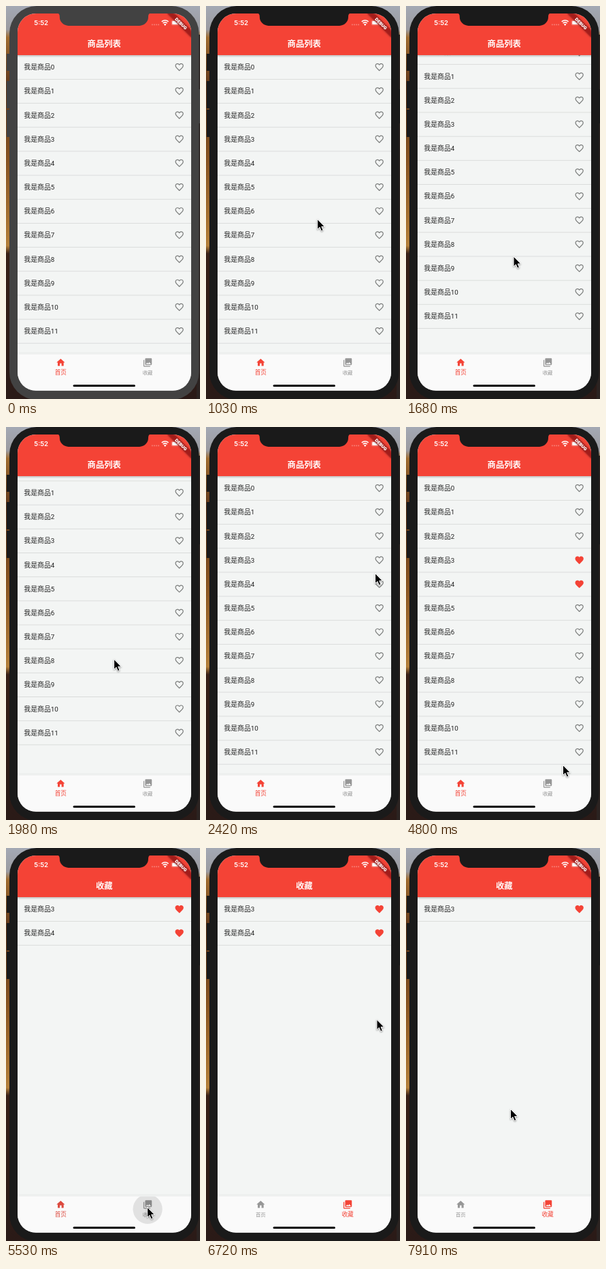
Recreate the animation shown at these times as an HTML page. Size 285 by 576 pixels, loop 8000 ms.

```html
<!DOCTYPE html>
<html lang="zh-CN">
<head>
<meta charset="utf-8">
<style>
html, body { margin: 0; width: 100%; height: 100%; overflow: hidden; background: #1b1b1b; }
svg { display: block; }
text { font-family: Roboto, "Noto Sans CJK SC", "Noto Sans CJK", sans-serif; }
.mid { text-anchor: middle; }
.inter { font-family: Inter, sans-serif; }
</style>
</head>
<body>
<svg width="285" height="576" viewBox="0 0 285 576">
  <defs>
    <linearGradient id="wall" x2="0" y2="1">
      <stop offset="0" stop-color="#a4a9b4"/><stop offset=".06" stop-color="#9b9ba0"/>
      <stop offset=".08" stop-color="#a06c30"/><stop offset=".2" stop-color="#62391a"/>
      <stop offset=".4" stop-color="#8a5520"/><stop offset=".61" stop-color="#b5803a"/>
      <stop offset=".63" stop-color="#3a2116"/><stop offset="1" stop-color="#2a1a17"/>
    </linearGradient>
    <linearGradient id="shade" x2="0" y2="1">
      <stop offset="0" stop-opacity=".2"/><stop offset="1" stop-opacity="0"/>
    </linearGradient>
    <clipPath id="screen"><rect x=".8" width="413.3" height="896" rx="44"/></clipPath>
    <clipPath id="nav"><rect y="810" width="414" height="86"/></clipPath>
    <path id="heart" d="M12 21.35l-1.45-1.32C5.4 15.36 2 12.28 2 8.5 2 5.42 4.42 3 7.5 3c1.74 0 3.41.81 4.5 2.09C13.09 3.81 14.76 3 16.5 3 19.58 3 22 5.42 22 8.5c0 3.78-3.4 6.86-8.55 11.54z"/>
    <path id="hollow" d="M16.5 3c-1.74 0-3.41.81-4.5 2.09C10.91 3.81 9.24 3 7.5 3 4.42 3 2 5.42 2 8.5c0 3.78 3.4 6.86 8.55 11.54L12 21.35l1.45-1.32C18.6 15.36 22 12.28 22 8.5 22 5.42 19.58 3 16.5 3zm-4.4 15.55l-.1.1-.1-.1C7.14 14.24 4 11.39 4 8.5 4 6.5 5.5 5 7.5 5c1.54 0 3.04.99 3.57 2.36h1.87C13.46 5.99 14.96 5 16.5 5c2 0 3.5 1.5 3.5 3.5 0 2.89-3.14 5.74-7.9 10.05z"/>
    <path id="home" d="M10 20v-6h4v6h5v-8h3L12 3 2 12h3v8z"/>
    <path id="photos" d="M22 16V4c0-1.1-.9-2-2-2H8c-1.1 0-2 .9-2 2v12c0 1.1.9 2 2 2h12c1.1 0 2-.9 2-2zm-11-4l2.03 2.71L16 11l4 5H8l3-4zM2 6v14c0 1.1.9 2 2 2h14v-2H4V6H2z"/>
  </defs>
  <rect width="285" height="576" fill="url(#wall)"/>
  <rect x="280" y="42" width="5" height="534" fill="#2b2321"/>
  <g id="bezel">
    <path d="M1 70h5v25H1zM1 110h5v40H1zM1 152h5v40H1zM282 122h3v50h-3z"/>
    <rect x="5" y="0" width="278.5" height="577" rx="40"/>
  </g>
  <g transform="translate(16.5 11) scale(.617)">
    <g clip-path="url(#screen)">
      <rect width="415" height="896" fill="#f3f5f4"/>
      <g id="list"></g>
      <rect y="98.9" width="415" height="6" fill="url(#shade)"/>
      <rect width="415" height="98.9" fill="#f44336"/>
      <text id="title" class="mid" x="207" y="79" font-size="20" font-weight="700" fill="#fff"></text>
      <g fill="#fff">
        <text class="mid inter" x="57" y="27.5" font-size="15.5" font-weight="600">5:52</text>
        <path d="M320 25h3v3h-3zm5 0h3v3h-3zm5 0h3v3h-3zm5 0h3v3h-3z" opacity=".3"/>
        <path d="M344 19.5a11.5 11.5 0 0 1 16 0M347 23a7 7 0 0 1 10 0" fill="none" stroke="#fff" stroke-width="2.6"/>
        <path d="M349 25.5a4.5 4.5 0 0 1 6 0L352 29z"/>
        <rect x="367.5" y="16.5" width="23" height="11" rx="3" fill="none" stroke="#fff" opacity=".5"/>
        <rect x="369" y="18" width="20" height="8" rx="1.5"/>
      </g>
      <rect y="804" width="415" height="6" fill="#000" opacity=".025"/>
      <rect y="810" width="415" height="86" fill="#fafafa"/>
      <g id="tabs" clip-path="url(#nav)"></g>
      <rect x="133" y="881.7" width="148" height="5" rx="2.5"/>
      <g transform="translate(414 0) rotate(45)">
        <rect x="-40" y="28" width="80" height="12" fill="#a51c1b" fill-opacity=".85"
          style="filter:drop-shadow(0 0 3px #0007)"/>
        <text class="mid inter" y="37.7" font-size="10.2" font-weight="900" fill="#fff">DEBUG</text>
      </g>
    </g>
    <path id="notch" d="M94-1q7 0 7 8v1a21 21 0 0 0 21 21h169a21 21 0 0 0 21-21v-1q0-8 7-8z"/>
  </g>
  <path id="cursor" d="M0 0V15l3.4-3.2 2.3 5.5 2.7-1.1-2.3-5.3h4.6z" stroke="#fff" stroke-width="1"
    style="filter:drop-shadow(0 1px 1px #0006)"/>
</svg>
<script>
const LOOP = 8000, TICK = 148.2, PHASE = 43;   // the screen refreshes once per tick
const SCALE = .617, ROW = 57, TOP = 99.5, RED = '#f44336', GRAY = '#979797';
const el = id => document.getElementById(id);

// Pointer gestures: start, end, x, y
const moves = [
  [600, 1000, 155, 303], [1230, 1520, 157, 400], [1525, 1800, 158, 340],
  [1960, 2410, 248, 214], [2430, 2860, 234, 194], [3500, 3750, 231, 231],
  [4500, 4780, 230, 495], [4780, 5220, 207, 526],
  [6130, 6560, 262, 300], [6560, 7000, 220, 122], [7470, 7890, 153, 382],
];

const progress = (t, a, b) => Math.min(1, Math.max(0, (t - a) / (b - a)));
const ease = p => p * p * (3 - 2 * p);

function pointer(t) {
  return moves.reduce(([x, y], [a, b, toX, toY]) => {
    const p = ease(progress(t, a, b));
    return [x + (toX - x) * p, y + (toY - y) * p];
  }, [262, 420]);
}

// The list is pulled past its end and springs back
const overscroll = t => 29 * Math.sin(Math.PI * progress(t, 1400, 2410));

function row(id, i, liked) {
  const y = TOP + i * ROW;
  return `<text x="16" y="${y + 33.8}" font-size="16" fill="#222">我是商品${id}</text>
    <use href="#${liked ? 'heart' : 'hollow'}" x="374" y="${y + 16}" fill="${liked ? RED : '#7d7f7e'}"/>
    <rect y="${y + 56}" width="415" height="1.5" fill="#d9dbda"/>`;
}

function tab(icon, label, x, color, size) {
  return `<g fill="${color}"><use href="#${icon}" x="${x - 12}" y="817"/>
    <text class="mid" x="${x}" y="857" font-size="${size}">${label}</text></g>`;
}

function draw(t) {
  const saved = t >= 5520, onSaved = t >= 5660, pressed = saved && !onSaved;
  const body = t >= 880 ? '#1a1a1a' : '#424242';
  el('bezel').setAttribute('fill', body);
  el('notch').setAttribute('fill', body);
  el('title').textContent = saved ? '收藏' : '商品列表';

  const liked = [];
  if (t >= 3290) liked.push(3);
  if (t >= 4180 && t < 7290) liked.push(4);
  const ids = saved ? liked : [...Array(12).keys()];
  el('list').innerHTML = ids.map((id, i) => row(id, i, liked.includes(id))).join('');
  el('list').setAttribute('transform', `translate(0 ${-overscroll(t) / SCALE})`);

  el('tabs').innerHTML =
    tab('home', '首页', 103.5, onSaved ? GRAY : pressed ? '#dc4a3f' : RED, onSaved ? 12 : 14) +
    tab('photos', '收藏', 310.5, onSaved ? RED : GRAY, onSaved ? 14 : 12) +
    (pressed ? '<circle cx="310.5" cy="840" r="35" opacity=".1"/>' : '');

  const [x, y] = pointer(t);
  el('cursor').setAttribute('transform', `translate(${x + .5} ${y + .5})`);
  el('cursor').setAttribute('visibility', t < 600 ? 'hidden' : 'visible');
}

let shown = -1;
function loop() {
  const now = performance.now() % LOOP;
  const t = PHASE + TICK * Math.floor((now - PHASE) / TICK);
  if (t !== shown) draw(shown = t);
  requestAnimationFrame(loop);
}
loop();
</script>
</body>
</html>
```
